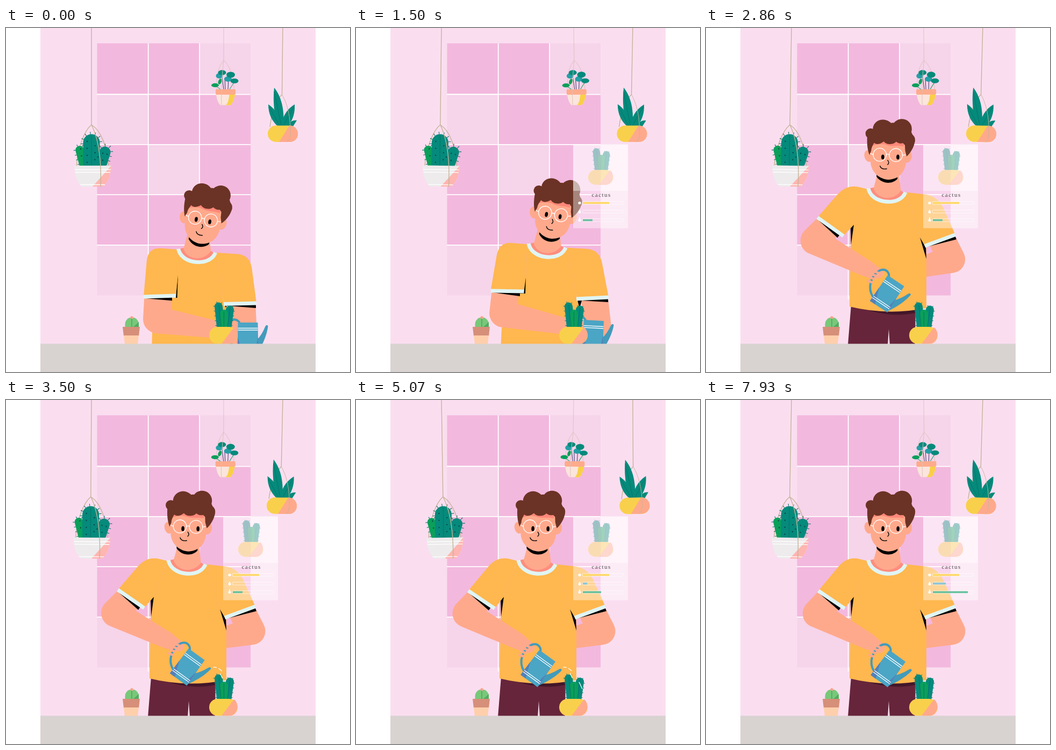
Animation of 640 by 640 pixels, one loop 8000 ms. Source, as an HTML page:

```html
<!DOCTYPE html>
<html lang="en">
<head>
<meta charset="utf-8">
<title>Watering the cactus</title>
<style>
html, body { margin: 0; width: 100%; height: 100%; overflow: hidden; background: #fff; }
svg { display: block; width: 100vw; height: 100vh; }
.cord { fill: none; stroke: #c6b398; stroke-width: 1.4; }
.thin { stroke-width: .9; }
.teal { fill: #058a7b; } .blue { fill: #239fa6; } .green { fill: #0a9f5a; }
.skin { fill: #ffa98c; } .shirt { fill: #ffb74f; } .hair { fill: #6b3325; }
.stem { fill: none; stroke: #058a7b; stroke-linecap: round; }
.stem.g { stroke: #0a9f5a; }
.spike { fill: none; stroke: #0b6f68; stroke-width: 6; stroke-dasharray: 1 8; }
.dots { fill: none; stroke: #07494d; stroke-linecap: round; stroke-width: 2.4; stroke-dasharray: 0 13; }
.ink { fill: none; stroke: #000; stroke-width: 1.4; stroke-linecap: round; }
.white { fill: none; stroke: #fff; stroke-width: 1.3; }
.cuff { fill: none; stroke: #e0f5f4; stroke-width: 7; }
</style>
</head>
<body>
<svg viewBox="0 0 640 640" xmlns="http://www.w3.org/2000/svg">
  <defs>
    <g id="potted">
      <path class="spike" style="stroke-width:3" d="M391 554L387.500 518A8 8 0 0 1 403.500 518M420 554L424.500 524A8 8 0 0 0 409 522"/>
      <path class="stem" stroke-width="15" d="M395.5 518L399.5 556M416.5 524L412 556"/>
      <path class="stem g" stroke-width="15" d="M405.5 531.5V556"/>
      <path fill="none" stroke="#066b66" stroke-width=".8" d="M396 515L400 556M417 520L412 556M405.5 528V556"/>
      <rect x="378" y="556" width="53" height="31.5" rx="15.7" fill="#f9d04b"/>
      <path class="skin" d="M424 557C434 562 433 587.500 415 587.500H401Z"/>
    </g>
  </defs>
  <rect x="64" width="512" height="640" fill="#fadef0"/>
  <g id="tiles"></g>

  <g id="leftPlant">
    <path class="cord" d="M159 -9V180C145 192 134 222 131 257M159 180C178 192 188 222 191 257"/>
    <path class="spike" d="M142 252V213A17 17 0 0 1 176 213V220"/>
    <path class="spike" d="M176 222A11.500 11.500 0 0 1 195.500 233L189 254"/>
    <path class="spike" d="M136 254L129 229A8.500 8.500 0 0 1 143 221"/>
    <path class="stem g" stroke-width="15.500" d="M137 227L144 254"/>
    <path class="stem" stroke-width="31" d="M159 213V244"/>
    <path class="stem" stroke-width="21" d="M184 231L178 250"/>
    <rect class="teal" x="143.500" y="240" width="40" height="18"/>
    <path class="dots" d="M151 211V255M166 219L165 256M180 233V256M171 240V250M139 225L142 250M188 235H189"/>
    <path d="M159 200V257" fill="none" stroke="#067068" stroke-width=".8"/>
    <path d="M127 256H196C195 274 190 288 180 295H142C132 288 128 274 127 256Z" fill="#edebec"/>
    <path d="M196 256C195 274 190 288 180 295H161Z" fill="#ffb5b0"/>
    <path class="white" d="M128 263.500H195M129 268.500H194M138 291.500H184"/>
    <path class="cord" d="M159 180C170 202 178 240 176 295"/>
  </g>

  <g id="midPlant">
    <path class="cord thin" style="stroke:#ddbfb9" d="M405 -9V60C397 70 391 84 392 114M405 60C416 70 424 90 424 114"/>
    <path fill="none" stroke="#39386c" d="M405 114L402 91M408 114L407 93M413 114L414 92"/>
    <path fill="none" stroke="#0a9f5a" d="M399 114L389 107M416 114L425 100"/>
    <g class="blue"><ellipse cx="397" cy="89" rx="6.500" ry="5"/><ellipse cx="413" cy="95" rx="7" ry="5"/></g>
    <g class="teal"><ellipse cx="402" cy="83" rx="7.500" ry="4.700"/><ellipse cx="418" cy="87" rx="8" ry="5.500"/><ellipse cx="425" cy="98.500" rx="7.500" ry="4.500"/></g>
    <g class="green"><ellipse cx="389" cy="106.500" rx="7" ry="3.700"/><ellipse cx="398" cy="99.500" rx="3" ry="5.500" transform="rotate(20 398 99.500)"/></g>
    <path d="M391 123H426C425 132 422 139 418 143.500H399C394 139 392 132 391 123Z" fill="#fbe5dc"/>
    <path d="M416 123H426C425 132 422 139 418 143.500H409C415 138 414 130 416 123Z" fill="#f9cf48"/>
    <rect x="390" y="114" width="37" height="10" rx="2" fill="#ffab8c"/>
    <path class="cord thin" style="stroke:#ddbfb9" d="M405 60C402 85 400 120 401 143"/>
  </g>

  <g id="rightPlant">
    <path class="cord" d="M515 -9L513.500 124C502 134 494 160 491 184"/>
    <g class="teal">
      <path d="M499 111C496 138 499 165 509 183H516C518 155 514 130 499 111Z"/>
      <path d="M488 142C488 160 495 174 506 183H513C510 165 501 151 488 142Z"/>
      <path d="M537 142C521 152 514 166 512 183H524C534 171 538 158 537 142Z"/>
      <path d="M541 172C532 171 527 176 524 183H534Z"/>
    </g>
    <path fill="none" stroke="#087067" stroke-width=".8" d="M499 118L512 182M490 147L509 182M535 147L516 182"/>
    <rect x="487" y="181.500" width="56" height="30.500" rx="15" fill="#f9d04b"/>
    <path class="skin" d="M527 181.500C548 181.500 549 212 527 212H508Z"/>
    <path class="cord thin" d="M513.500 124C523 140 530 165 529 200Q528 208 523 212"/>
  </g>

  <path id="pants" fill="#66253a" d="M270 515L264 590H338L340 560L342 590H389L390 515Z"/>
  <path id="hemShade" fill="#43162a"/>
  <path id="armR" class="skin"/>
  <path id="torso" class="shirt"/>
  <path id="armL" class="skin"/>
  <path id="folds" d=""/>
  <path id="sleeves" class="shirt"/>
  <path id="cuffs" class="cuff"/>
  <g id="neck">
    <path d="M-38 -1C-30 32 30 32 38 1L31 -1C20 10 -20 10 -31 -2Z" fill="#e0f5f4"/>
    <path d="M-31 -2C-24 23 24 23 31 0L18 -6H-18Z" fill="#ff8d7e"/>
    <path class="skin" d="M-19 -34L-25 -2C-17 18 14 19 26 -2L20 -34Z"/>
  </g>
  <g id="head">
    <path d="M-20 36V41C-10 55 10 55 19 44V36Z"/>
    <ellipse class="skin" cx="-36" cy="3" rx="7.500" ry="11" transform="rotate(-15 -36 3)"/>
    <ellipse class="skin" cx="37" cy="3" rx="7.500" ry="11" transform="rotate(15 37 3)"/>
    <path class="skin" d="M-32 -28V12C-31 34 -13 46 2 46C21 45 34 32 34 10V-28Z"/>
    <path d="M-29 -28V-16C-21 -20 -9 -21 -2 -18C8 -15 20 -19 29 -16L30 -30Z" fill="#ff8879"/>
    <g class="hair">
      <circle cx="-33" cy="-39" r="9.500"/><ellipse cx="-10" cy="-48" rx="19" ry="17.500"/>
      <circle cx="25" cy="-49" r="18.500"/><circle cx="38" cy="-29" r="12"/>
      <path d="M-39 -34C-40 -18 -37 -5 -34 1L-31 -7C-31 -13 -28 -18 -26 -22C-20 -17 -13 -21 -8 -25C-4 -19 9 -18 15 -25C20 -21 26 -21 31 -24L32 -9L35 2C42 -4 49 -16 50 -28L36 -58L8 -60L-20 -56Z"/>
    </g>
    <g class="white"><circle cx="-15" r="12.200"/><circle cx="15" r="12.200"/><path d="M-2.800 0Q0 -3 2.800 0M-27 0L-33 -2M27 0L33 -1"/></g>
    <ellipse id="eyeL" rx="2.800" ry="4.600"/><ellipse id="eyeR" rx="2.800" ry="4.600"/>
    <path class="ink" d="M0 10Q4 15 0 18"/>
    <path id="mouth" class="ink" stroke-width="1.700" d="M-8.500 25Q-6 32 4 30"/>
  </g>
  <path id="hand" class="skin"/>
  <g id="can">
    <path fill="none" stroke="#429bbb" stroke-width="4" d="M-14 -24C-15 -34 -28 -40 -36 -28C-44 -12 -38 12 -18 20"/>
    <path d="M17 3Q26 -6 32.500 -22Q35 -26 37.500 -22.500Q35 -1 19 26Z" fill="#429bbb"/>
    <path d="M-18.500 -29H18.500L19.500 29H-19.500Z" fill="#4ba5c5"/>
    <path d="M-19 -1L-19.500 29H-8ZM18.500 -2L19.500 20L14 25Z" fill="#557fb9"/>
    <path class="white" d="M-18.500 -18.500H18.500M-18.500 -15H18.500M-19 18H19M-19 21.500H19"/>
    <path stroke="#ffa98c" stroke-width="4.500" stroke-linecap="round" d="M-44 -21L-35 -23M-45 -14L-36 -16M-45 -7L-36 -9M-43 0L-35 -2"/>
  </g>

  <g>
    <path d="M217 556H249L247 573H219Z" fill="#d68f79"/>
    <path d="M219 572H247L245 588H221Z" fill="#ffcfab"/>
    <path d="M221.500 556V551A12.500 12.500 0 0 1 247 551V556Z" fill="#78c87a"/>
    <path d="M247 547V556H237Z" fill="#50ad5f"/>
    <path d="M234 540V556" stroke="#3d8e52" fill="none"/>
    <circle cx="234" cy="538.500" r="2.600" fill="#ffa08e"/>
  </g>
  <use href="#potted"/>
  <path id="water" class="white" stroke-linecap="round"/>
  <rect x="64" y="587.500" width="512" height="53" fill="#d8d2d1"/>

  <g id="card">
    <rect x="404" y="216.500" width="102" height="156" fill="#fff" opacity=".4"/>
    <rect x="404" y="216.500" width="102" height="86.500" fill="#fff" opacity=".38"/>
    <use href="#potted" opacity=".38" transform="translate(98.400 -226.500) scale(.882)"/>
    <text x="438.500" y="314" font-family="'Liberation Serif', serif" font-size="11" letter-spacing="1.450" fill="#4c444a">cactus</text>
    <g fill="#fff">
      <circle cx="416" cy="325.500" r="2.600"/>
      <path d="M416 337.500Q421 345 416 345Q411 345 416 337.500M413.500 356H418.500L418 360H414ZM415 352.500H417V356H415Z"/>
    </g>
    <g class="white" style="stroke-width:.8" opacity=".75"><rect x="421" y="322.800" width="77" height="5.400" rx="2"/><rect x="421" y="338.800" width="77" height="5.400" rx="2"/><rect x="421" y="354.800" width="77" height="5.400" rx="2"/></g>
    <rect x="422" y="323.700" width="49" height="3.600" fill="#ffd966"/>
    <rect id="waterBar" x="422" y="339.700" height="3.600" fill="#8cc6dc"/>
    <rect id="growBar" x="422" y="355.700" height="3.600" fill="#68c1a0"/>
  </g>
</svg>
<script>
const LOOP = 8000;
const el = {};
document.querySelectorAll('[id]').forEach(node => el[node.id] = node);
const draw = (id, d) => el[id].setAttribute('d', d);
const place = (id, [x, y, turn = 0]) => el[id].setAttribute('transform', `translate(${x} ${y}) rotate(${turn})`);

// Wall tiles, L marks the light ones
let tiles = '';
['DDL', 'LDD', 'DLD', 'DDD', 'LDD'].forEach((row, r) => [...row].forEach((kind, c) => {
  tiles += `<rect x="${169.5 + c * 95.2}" y="${28.5 + r * 93.8}" width="95.2" height="93.8" fill="${kind === 'L' ? '#f6d4ea' : '#f3b8de'}"/>`;
}));
tiles += '<path fill="none" stroke="#fff" stroke-width="1.800" d="M264.700 28.500V505M360 28.500V497M169 123.500H455M169 216.900H455M169 310.200H455M169 403.800H455"/>';
el.tiles.innerHTML = tiles;

// Arms: shoulder, cuff left end, cuff right end, elbow, wrist. Fold: armpit and two lower corners.
const bent = {
  neck: [355, 415, 4.6], head: [366.5, 355.5, 9.8], look: [0], can: [450, 577, 0], pants: [0, 115],
  left: [264, 408, 256, 500, 316, 498, 281, 543, 398, 562], right: [454, 422, 405, 513.5, 466, 512, 441, 560, 416, 580],
  foldL: [320, 457, 316, 502, 318.5, 502], foldR: [406, 514, 412, 515, 409, 520],
  body: [272, 565, 270, 640, 415, 640, 412, 520]
};
const lifting = {
  neck: [355.5, 405.5, 5], head: [366.7, 346, 8.7], look: [.05], can: [441, 573, 3], pants: [0, 105],
  left: [266, 398, 250.5, 489, 312.5, 490, 274, 532, 385, 554], right: [453, 412, 410, 504, 470, 501, 449, 552, 420, 580],
  foldL: [316, 464, 305, 494, 315, 494], foldR: [412, 506, 420, 507, 416, 522],
  body: [271, 558, 268, 625, 412, 630, 415, 515]
};
const upright = {
  neck: [335.5, 304, 1.5], head: [336, 241, 0], look: [1], can: [335, 477, 12.5], pants: [0, 0],
  left: [257, 294, 201.5, 347.5, 243, 387, 190, 389, 291, 452], right: [432, 313, 407, 410, 463, 389, 454, 434, 390, 462],
  foldL: [276, 363, 268, 370, 268, 405], foldR: [397, 393, 408, 412, 409, 435],
  body: [269, 372, 267, 521, 411, 521, 409, 412]
};
const pouring = {
  neck: [336.5, 302.5, 5], head: [338.5, 235.6, 1.5], look: [1], can: [337.5, 496.2, 36], pants: [0, 0],
  left: [262, 290, 208, 353, 257, 387, 202, 397, 300, 447], right: [431, 312, 407, 405, 464, 384, 457, 430, 391, 446],
  foldL: [275, 366, 269, 373, 270, 403], foldR: [398, 389, 409, 406, 410, 429],
  body: [270, 373, 267, 518, 410, 521, 410, 406]
};
const settled = { ...pouring, can: [339.2, 499.7, 36], left: [263, 290, 209, 355, 258, 388, 205, 398, 302, 449] };

const smooth = u => u * u * (3 - 2 * u);
const easeIn = u => u * u;
const easeOut = u => 1 - (1 - u) ** 3;
const clamp = u => Math.min(1, Math.max(0, u));
const steps = [
  [870, 1500, bent, lifting, easeIn],
  [1500, 2210, lifting, upright, smooth],
  [2210, 3400, upright, pouring, easeOut],
  [3400, 6600, pouring, settled, easeOut]
];

function poseAt(t) {
  const [from, to, a, b, ease] = steps.find(s => t < s[1]) || steps[steps.length - 1];
  const k = ease(clamp((t - from) / (to - from)));
  const pose = {};
  for (const part in a) pose[part] = a[part].map((v, i) => v + (b[part][i] - v) * k);
  return pose;
}

const lerp = (p, q, k) => [p[0] + (q[0] - p[0]) * k, p[1] + (q[1] - p[1]) * k];
const pairs = list => list.reduce((out, v, i) => (i % 2 ? out[out.length - 1].push(v) : out.push([v]), out), []);
const poly = points => 'M' + points.map(p => p.join(' ')).join('L') + 'Z';
const towards = (p, q, dist) => lerp(p, q, dist / Math.hypot(q[0] - p[0], q[1] - p[1]));

// Tapered segment with round ends
function limb(p, rp, q, rq) {
  const dir = Math.atan2(q[1] - p[1], q[0] - p[0]);
  const spread = Math.acos(Math.max(-1, Math.min(1, (rp - rq) / Math.hypot(q[0] - p[0], q[1] - p[1]))));
  const at = (c, r, a) => `${c[0] + r * Math.cos(a)} ${c[1] + r * Math.sin(a)}`;
  const [a, b] = [dir + spread, dir - spread];
  return `M${at(p, rp, a)}A${rp} ${rp} 0 1 1 ${at(p, rp, b)}L${at(q, rq, b)}A${rq} ${rq} 0 0 1 ${at(q, rq, a)}Z`;
}

function local([x, y, turn], dx, dy) {
  const a = turn * Math.PI / 180;
  return [x + dx * Math.cos(a) - dy * Math.sin(a), y + dx * Math.sin(a) + dy * Math.cos(a)];
}

function sleeve(collar, shoulder, outer, inner, armpit) {
  const start = towards(shoulder, collar, 24), end = towards(shoulder, outer, 26);
  return `M${collar}L${start}Q${shoulder} ${end}L${outer}L${inner}L${armpit}Z`;
}

// Dark wedge under a cuff, widest at its right end
function wedge(l, r, reach, depth) {
  const len = Math.hypot(r[0] - l[0], r[1] - l[1]);
  const n = [-(r[1] - l[1]) / len, (r[0] - l[0]) / len];
  const off = (p, d) => [p[0] + n[0] * d, p[1] + n[1] * d];
  const end = lerp(l, r, reach);
  return poly([off(lerp(l, r, .06), 3), off(end, 2), off(end, depth)]);
}

function drawMan(t) {
  const pose = poseAt(t);
  const [shL, outL, inL, elbowL, wristL] = pairs(pose.left);
  const [shR, inR, outR, elbowR, wristR] = pairs(pose.right);
  const [sideL, hemL, hemR, sideR] = pairs(pose.body);
  const foldL = pairs(pose.foldL), foldR = pairs(pose.foldR);
  const collarL = local(pose.neck, -37, 0), collarR = local(pose.neck, 37, 0);
  const hem = lerp(hemL, hemR, .5);
  const grip = local(pose.can, -36, -22);

  place('pants', pose.pants);
  draw('hemShade', `M${hemL[0] + 3} ${hemL[1] - 4}Q${hem[0]} ${hem[1] + 22} ${hemR[0] - 21} ${hemR[1] + 9}V${hemR[1] - 4}Z`);
  draw('armR', limb(lerp(inR, outR, .56), 25, elbowR, 25.5) + limb(elbowR, 25.5, wristR, 18));
  draw('torso', `M${collarL}L${foldL[0]}L${sideL}L${hemL}Q${hem[0]} ${hem[1] + 16} ${hemR}L${sideR}L${foldR[0]}L${collarR}Z`);
  draw('armL', limb(lerp(outL, inL, .44), 25, elbowL, 26) + limb(elbowL, 25, wristL, 15.5));
  draw('folds', wedge(outL, inL, .88, 9) + wedge(inR, outR, .98, 9) + poly(foldL) + poly(foldR));
  draw('sleeves', sleeve(collarL, shL, outL, inL, foldL[0]) + sleeve(collarR, shR, outR, inR, foldR[0]));
  draw('cuffs', `M${outL}L${inL}M${inR}L${outR}`);
  draw('hand', limb(wristL, 15, grip, 10));
  place('can', pose.can);
  place('neck', pose.neck);

  const nod = t < 900 ? 1.2 * Math.sin(Math.PI * t / 900) ** 2 : 0;
  const [look] = pose.look;
  place('head', [pose.head[0], pose.head[1], pose.head[2] - nod]);
  place('eyeL', [-12.3 + 3 * look, 2.7 + 1.4 * look]);
  place('eyeR', [13.3 + 5.5 * look, 3 + .6 * look]);
  place('mouth', [-5.5 * look, -4 * look]);
}

// Hanging plants: [time, sideways shift at pot height]
const swings = [
  ['leftPlant', 159, 275, [[0, 0], [2450, -5], [5100, 4.3], [7850, -5], [10500, 4]]],
  ['midPlant', 405, 130, [[0, 0], [2000, 2.3], [4700, -2.1], [7250, 2.3], [9800, -2]]],
  ['rightPlant', 515, 197, [[0, 0], [2850, -3], [5450, 3.7], [7980, -3.5], [10500, 3]]]
];
function drawPlants(t) {
  for (const [id, x, depth, keys] of swings) {
    const i = keys.findIndex(k => k[0] > t);
    const [[t0, v0], [t1, v1]] = [keys[i - 1], keys[i]];
    const shift = v0 + (v1 - v0) * (1 - Math.cos(Math.PI * (t - t0) / (t1 - t0))) / 2;
    el[id].setAttribute('transform', `rotate(${-shift / depth * 180 / Math.PI} ${x} 0)`);
  }
}

function drawWater(t) {
  const drop = (u, reach) => [382 + reach * u, 498 - 10 * u + 26 * u * u];
  let d = '';
  for (let k = 0; k < 21; k++) {
    const u = (t - 3080 - k * 175) / 480;
    if (u < 0 || u > 1.35) continue;
    const reach = k % 3 ? 27 : 19;
    d += `M${drop(u, reach)}L${drop(u + .1, reach)}L${drop(u + .2, reach)}`;
  }
  draw('water', d);
}

function drawCard(t) {
  const poured = Math.max(0, t - 3600);
  el.card.setAttribute('opacity', smooth(clamp((t - 300) / 600)));
  el.waterBar.setAttribute('width', .0056 * poured);
  el.growBar.setAttribute('width', 18 + .0109 * poured);
}

const begin = performance.now();
function frame() {
  const t = (performance.now() - begin) % LOOP;
  drawPlants(t);
  drawMan(t);
  drawWater(t);
  drawCard(t);
  requestAnimationFrame(frame);
}
frame();
</script>
</body>
</html>
```
